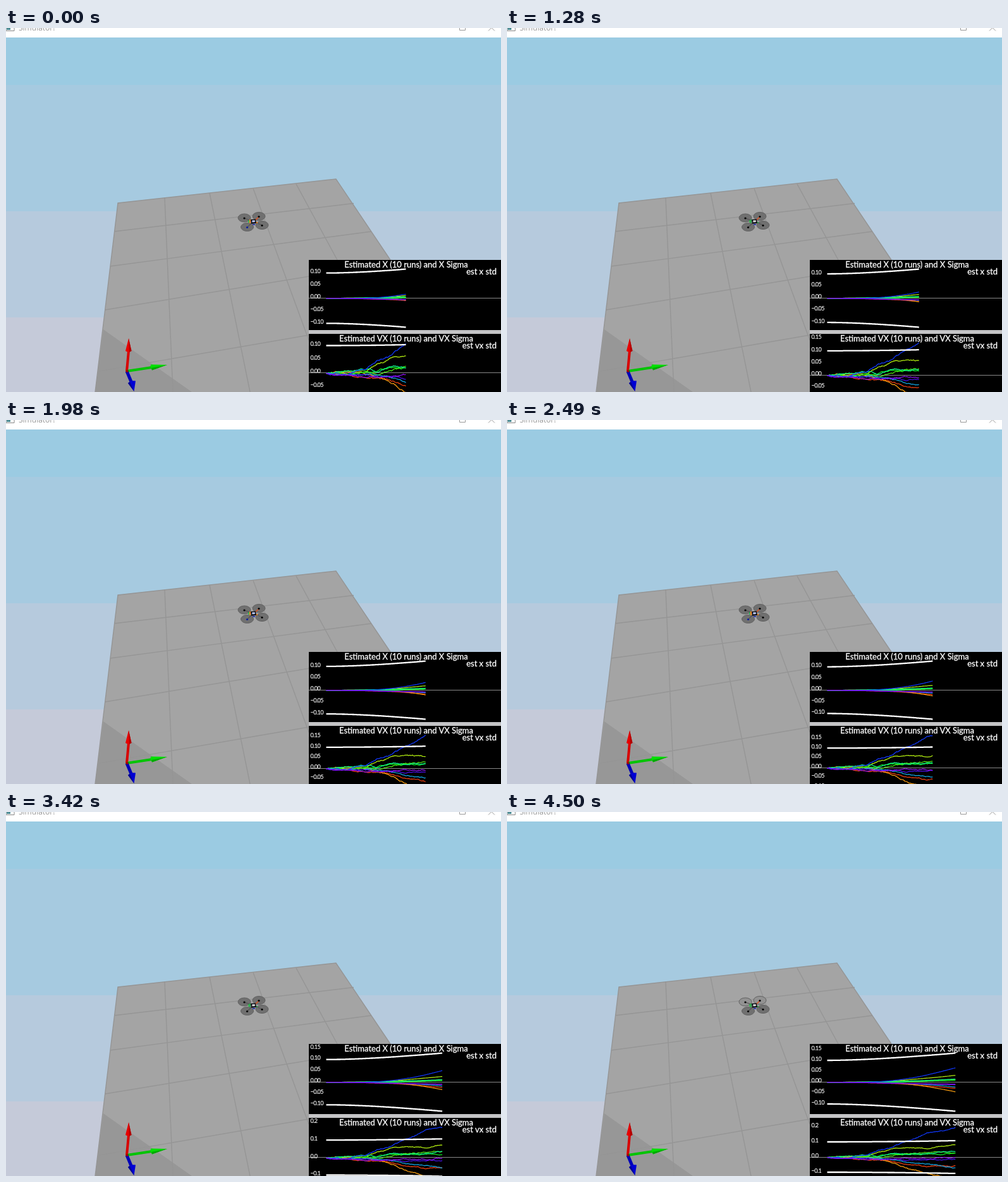
These frames come from a looping animation (783 by 576 pixels, 4.6 s). An HTML page:

```html
<!DOCTYPE html>
<html lang="en">
<head>
<meta charset="utf-8">
<title>Simulator</title>
<style>
  html, body { margin: 0; width: 100%; height: 100%; overflow: hidden; background: #fff; }
  svg { display: block; }
  .caption { font: 13px Lato, sans-serif; fill: #fff; stroke: #fff; stroke-width: .3px; }
  .tick { font: 9px Lato, sans-serif; letter-spacing: -.5px; fill: #fff; stroke: #fff; stroke-width: .15px; }
  .window { font: 12px "Open Sans", sans-serif; fill: #999; }
</style>
</head>
<body>
<svg id="stage" width="783" height="576" viewBox="0 0 783 576">
  <rect width="783" height="15" fill="#fff"/>
  <path d="M0 0V4.5H13V0" fill="#fff" stroke="#888"/>
  <rect x="1" width="6" height="3" fill="#4c8c94"/>
  <text class="window" x="20" y="4">Simulator!</text>
  <path d="M717.5 0V3.5H726.5V0M763 4.500L768 -.5L773 4.500" fill="none" stroke="#999"/>

  <rect y="15" width="783" height="75" fill="#9bcbe2"/>
  <rect y="90" width="783" height="200" fill="#a6cae0"/>
  <rect y="290" width="783" height="168" fill="#b6cadd"/>
  <rect y="458" width="783" height="118" fill="#c5cad9"/>

  <path d="M177 277L522 239L748 576H141Z" fill="#a4a4a4"/>
  <path d="M154 477L294 576H141Z" fill="#979797"/>
  <path d="M141 576L177 277L522 239L608 367M171 322L550 277.500M165 377L578 322M157 446L608 372M148 543L490 484
    M251 269L264 576M322 261L386 576M391 254L479 494M459 247L524 367" fill="none" stroke="#959595" stroke-width="1.4"/>

  <g id="drone"></g>

  <g id="axes">
    <path d="M191 543L194 511" stroke="#d80000" stroke-width="4"/>
    <path d="M194 491L189 511Q193 514 198.500 511Z" fill="#e80000"/>
    <path d="M194 491L195 513L198.500 511Z" fill="#b00000"/>
    <path d="M191 543L231 537" stroke="#00c400" stroke-width="4"/>
    <path d="M255 533L229 532.500Q228 537 231 541.500Z" fill="#00e000"/>
    <path d="M255 533L230 538L231 541.500Z" fill="#00a800"/>
    <path d="M191 543L199 562" stroke="#0000b8" stroke-width="5"/>
    <path d="M202.500 575L193 562Q197 557 205 558.500Z" fill="#0000d4"/>
    <path d="M202.500 575L193 562L196 560Z" fill="#000090"/>
    <circle cx="191.500" cy="543" r="2" fill="#a00000"/>
  </g>

  <rect x="479" y="478" width="304" height="6" fill="#c4c4c6"/>
</svg>
<script>
const NS = 'http://www.w3.org/2000/svg';
const LOOP = 4600;
const LEFT = 506.5, SPAN = 203;
const TICKS = [0, 120, 450, 575, 700, 870, 1000, 1150, 1280, 1420, 1550, 1700, 1830, 1980, 2100, 2220, 2370,
  2490, 2610, 2730, 2880, 3000, 3150, 3270, 3420, 3540, 3660, 3820, 3960, 4080, 4230, 4350, 4500];
const stage = document.getElementById('stage');

function add(parent, tag, attrs, text) {
  const node = document.createElementNS(NS, tag);
  for (const key in attrs) node.setAttribute(key, attrs[key]);
  if (text) node.textContent = text;
  parent.appendChild(node);
  return node;
}

function lerpAt(xs, ys, x) {
  let i = 1;
  while (i < xs.length - 1 && x > xs[i]) i++;
  const k = (x - xs[i - 1]) / (xs[i] - xs[i - 1]);
  return ys[i - 1] + (ys[i] - ys[i - 1]) * k;
}

function random(seed) {
  return () => (seed = (seed * 16807) % 2147483647) / 2147483647;
}

// Velocity of each run in thousandths at KNOTS; position is its integral.
const KNOTS = [0, .15, .3, .4, .5, .62, .78, .9, 1];
const RUNS = [
  ['#f04010', -6, -12, -18, -28, -51, -62, -58, -58],
  ['#ffa010', 4, 0, -14, -34, -73, -106, -130, -150],
  ['#b4f010', -4, 2, 34, 50, 63, 57, 72, 79],
  ['#50e810', 8, 12, -4, 8, 18, 30, 34, 27],
  ['#10f020', -8, 2, 12, 18, 16, 20, 16, 24],
  ['#10f490', 6, 14, 2, 24, 18, 24, 36, 36],
  ['#10a8e8', -10, -4, -8, -16, -34, -44, -58, -70],
  ['#1038ff', -6, 14, 46, 62, 105, 156, 170, 195],
  ['#4810e8', -12, -8, -14, -12, -18, -16, -20, -14],
  ['#9010f0', -6, -14, -8, -14, -8, -10, -4, -6]
];
const SAMPLES = 150, DURATION = .85;

const runs = RUNS.map(([color, ...knots], index) => {
  const rand = random(977 * (index + 3));
  const values = [0, ...knots].map(v => v / 1000);
  const velocity = [], position = [];
  let noise = 0, sum = 0;
  for (let i = 0; i <= SAMPLES; i++) {
    noise = noise * .86 + (rand() - .5) * .0045;
    const v = lerpAt(KNOTS, values, i / SAMPLES) + noise;
    sum += v * DURATION / SAMPLES;
    velocity.push(v);
    position.push(sum);
  }
  return { color, velocity, position };
});

const sigmaX = u => Math.sqrt(.01 + .0078 * u ** 1.75);
const sigmaV = u => Math.sqrt(.01 + .0017 * u * u);

function makeChart(top, height, title, legend, key, sigma) {
  const id = 'clip-' + key;
  add(add(stage, 'clipPath', { id }), 'rect', { x: 479, y: top, width: 304, height });
  const g = add(stage, 'g', { 'clip-path': `url(#${id})`, fill: 'none' });
  add(g, 'rect', { x: 479, y: top, width: 304, height, fill: '#000' });
  const axis = add(g, 'path', { stroke: '#888' });
  const lines = runs.map(run => add(g, 'path', { stroke: run.color, 'stroke-width': 1.25 }));
  const bounds = [1, -1].map(() => add(g, 'path', { stroke: '#fff', 'stroke-width': 2.3 }));
  const labels = Array.from({ length: 9 }, () => add(g, 'text', { class: 'tick', x: 481.5 }));
  add(g, 'text', { class: 'caption', x: 633, y: top + 12, 'text-anchor': 'middle' }, title);
  add(g, 'text', { class: 'caption', x: 776, y: top + 23, 'text-anchor': 'end' }, legend);

  return (end, zero, scale) => {
    const y = value => zero - value * scale;
    const trace = value => {
      let d = '';
      for (let i = 0; i < end * SAMPLES; i++) d += `${i ? 'L' : 'M'}${(LEFT + i / SAMPLES * SPAN).toFixed(1)} ${y(value(i)).toFixed(1)}`;
      return d + `H${(LEFT + end * SPAN).toFixed(1)}`;
    };
    axis.setAttribute('d', `M479 ${Math.floor(zero) + .5}H783`);
    lines.forEach((line, i) => line.setAttribute('d', trace(n => runs[i][key][n])));
    bounds.forEach((line, i) => line.setAttribute('d', trace(n => (i ? -1 : 1) * sigma(n / SAMPLES))));

    const coarse = scale * .05 < 14.5;
    const step = coarse ? .1 : .05;
    labels.forEach((label, i) => {
      const value = (i - 4) * step;
      const ly = y(value);
      const shown = ly >= top + 5.5 && ly < top + height + 6 - (height > 100 ? 8 : 0);
      label.setAttribute('visibility', shown ? 'visible' : 'hidden');
      label.setAttribute('y', (ly + .7).toFixed(1));
      label.textContent = (value < 0 ? '\u2212' : '') + Math.abs(value).toFixed(coarse ? 1 : 2);
    });
  };
}

const drawX = makeChart(367, 111, 'Estimated X (10 runs) and X Sigma', 'est x std', 'position', sigmaX);
const drawV = makeChart(484, 92, 'Estimated VX (10 runs) and VX Sigma', 'est vx std', 'velocity', sigmaV);

const drone = document.getElementById('drone');
const rotors = [[377, 300.5], [400, 298], [381.5, 315], [405, 312]].map(([cx, cy]) => {
  const disc = add(drone, 'ellipse', { cx, cy, rx: 10, ry: 6.5, fill: '#707070', stroke: '#606060' });
  return { disc, cx, cy };
});
add(drone, 'path', { d: 'M391 306L377 301M391 306L382 315M391 306L405 312', stroke: '#555', 'stroke-width': 1.2 });
add(drone, 'path', { d: 'M392 306L400 299', stroke: '#e05020', 'stroke-width': 1.6 });
add(drone, 'path', { d: 'M384 304V308', stroke: '#20c040', 'stroke-width': 1.5 });
const glow = add(drone, 'path', { d: 'M386 303V309M395 308H398', stroke: '#f08020', 'stroke-width': 2 });
add(drone, 'path', { d: 'M387 303L395 302.500L396 309L388 310Z', fill: '#101018' });
const core = add(drone, 'path', { d: 'M389 304.500L393.500 304L394 307L389.500 307.500Z' });
add(drone, 'path', { d: 'M390 311H394', stroke: '#1020b0', 'stroke-width': 1.5 });
const hubs = rotors.map(({ cx, cy }) => add(drone, 'circle', { cx, cy: cy + .5, r: 1.6 }));

function drawDrone(step) {
  const lit = step === 0 || step % 2 === 1;
  glow.setAttribute('stroke', lit ? '#f08020' : '#30a050');
  core.setAttribute('fill', lit ? '#b8c4f0' : '#d8d8d8');
  hubs[2].setAttribute('fill', lit ? '#1020a0' : '#000');
  rotors.forEach(({ disc }, i) => disc.setAttribute('fill', step > 30 && i < 2 ? '#929292' : '#707070'));
}

const SCALE_STEPS = [0, 4, 8, 13, 17, 24, 32];
const V_ZERO = [545.5, 548, 549, 551, 550, 546.8, 546];
const V_SCALE = [430, 396, 382, 332, 308, 277, 240];

function render(time) {
  let step = TICKS.length - 1;
  while (TICKS[step] > time) step--;
  const end = (126 + 2.4 * step) / SPAN;
  drawDrone(step);
  drawX(end, 427.5, 46 / sigmaX(end));
  drawV(end, lerpAt(SCALE_STEPS, V_ZERO, step), lerpAt(SCALE_STEPS, V_SCALE, step));
}

const start = performance.now();
function loop() {
  render((performance.now() - start) % LOOP);
  requestAnimationFrame(loop);
}
loop();
</script>
</body>
</html>
```
